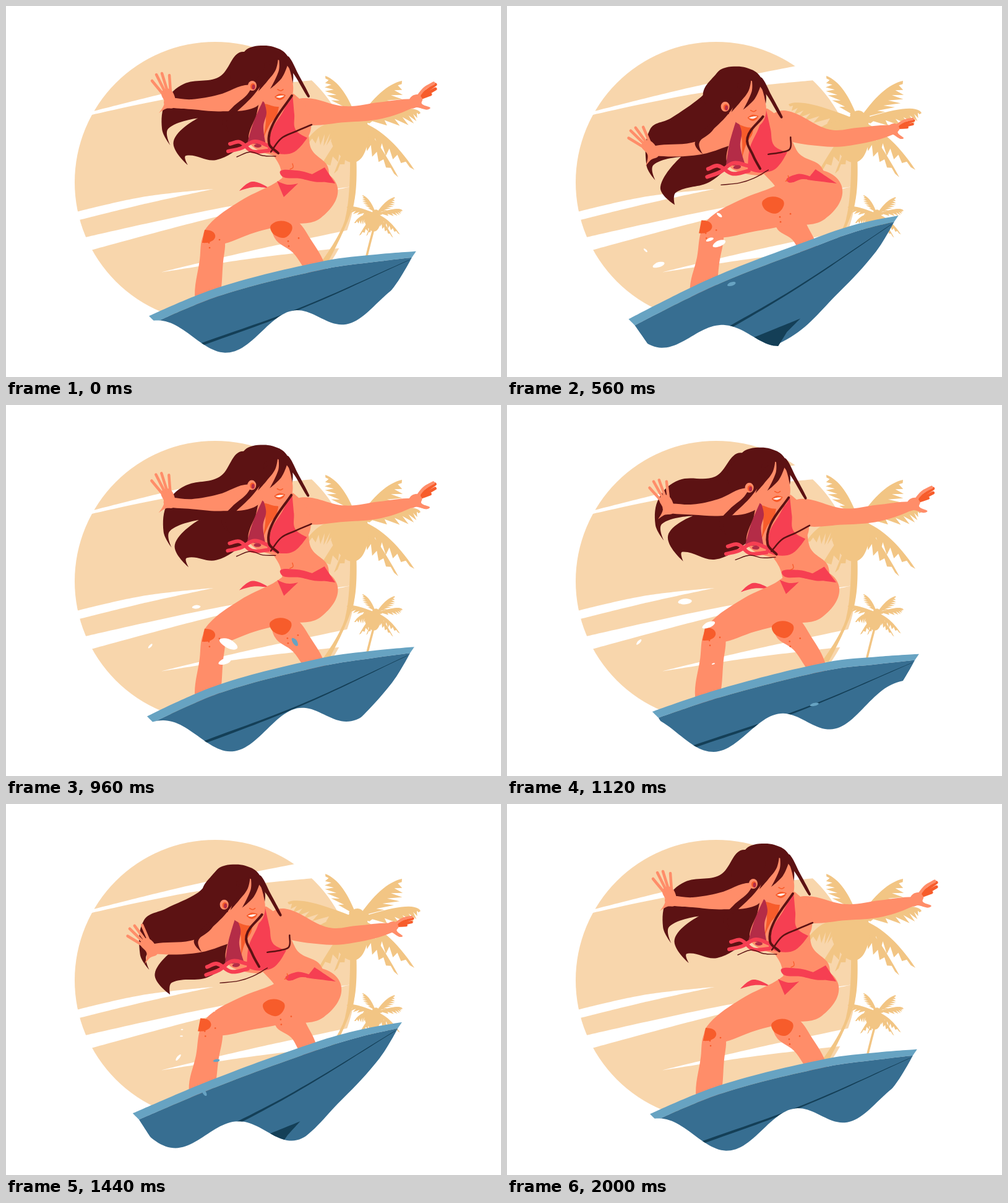
These frames come from a looping animation (800x600 px, 2.04 s). An HTML page with a canvas:

```html
<!DOCTYPE html>
<html lang="en">
<head>
<meta charset="utf-8">
<title>Surfer</title>
<style>
html, body { margin: 0; width: 100%; height: 100%; overflow: hidden; background: #fff; }
canvas { display: block; width: 800px; height: 600px; }
</style>
</head>
<body>
<canvas id="stage" width="800" height="600"></canvas>
<script>
const ctx = document.getElementById('stage').getContext('2d');
const SKIN = '#ff8d69', ORANGE = '#f75c2b', HAIR = '#5c1213', RED = '#f63f52', ROSE = '#b42c47';
const SUN = '#f8d6ac', PALM = '#f2c584', BLUE = '#376e91', LIGHT = '#67a3c2', DARK = '#143f57';
const CYCLE = 1000, LOOP = 2040, STEP = 40;
let phase = 0;

// 0 at the top of the ride, 1 at the bottom; lag is a share of the cycle.
const swing = (lag = 0) => (1 - Math.cos(2 * Math.PI * (phase - lag))) / 2;
const lerp = (a, b, k) => a + (b - a) * k;

// Points are "x,y" or "x,y,width"; a trailing ! marks a corner.
function parse(text) {
  return text.trim().split(/\s+/).map(word => {
    const [x, y, w] = word.split(',').map(parseFloat);
    return { x, y, w, sharp: word.endsWith('!') };
  });
}

// A part swings between its high and low pose; lag(point) gives [x, y] delays.
function part(high, low, lag = () => [0, 0]) {
  const a = parse(high), b = parse(low);
  return () => a.map((p, i) => {
    const [lx, ly] = lag(p), q = b[i];
    return { x: lerp(p.x, q.x, swing(lx)), y: lerp(p.y, q.y, swing(ly)), w: lerp(p.w, q.w, swing(lx)), sharp: p.sharp };
  });
}

const points = shape => typeof shape === 'string' ? parse(shape) : typeof shape === 'function' ? shape() : shape;

function trace(pts, closed) {
  const n = pts.length;
  const get = i => closed ? pts[(i + n) % n] : pts[Math.max(0, Math.min(n - 1, i))];
  const dir = i => {
    const a = get(i - 1), b = get(i + 1), l = Math.hypot(b.x - a.x, b.y - a.y) || 1;
    return get(i).sharp ? [0, 0] : [(b.x - a.x) / l, (b.y - a.y) / l];
  };
  ctx.beginPath();
  ctx.moveTo(pts[0].x, pts[0].y);
  for (let i = 0; i < (closed ? n : n - 1); i++) {
    const a = get(i), b = get(i + 1), s = Math.hypot(b.x - a.x, b.y - a.y) * .36;
    const p = dir(i), q = dir(i + 1);
    ctx.bezierCurveTo(a.x + p[0] * s, a.y + p[1] * s, b.x - q[0] * s, b.y - q[1] * s, b.x, b.y);
  }
}

function fill(shape, color) {
  trace(points(shape), true);
  ctx.fillStyle = color;
  ctx.fill();
}

function line(shape, color, width) {
  trace(points(shape), false);
  ctx.strokeStyle = color;
  ctx.lineWidth = width;
  ctx.lineCap = 'round';
  ctx.stroke();
}

// A tapered, round-ended band along a few joints.
function limb(shape, color) {
  const pts = points(shape), n = pts.length, left = [], right = [], tips = [];
  pts.forEach((p, i) => {
    const a = pts[Math.max(0, i - 1)], b = pts[Math.min(n - 1, i + 1)];
    const l = Math.hypot(b.x - a.x, b.y - a.y), dx = (b.x - a.x) / l * p.w / 2, dy = (b.y - a.y) / l * p.w / 2;
    left.push({ x: p.x + dy, y: p.y - dx });
    right.unshift({ x: p.x - dy, y: p.y + dx });
    if (i === 0) tips.push({ x: p.x - dx, y: p.y - dy });
    if (i === n - 1) tips.push({ x: p.x + dx, y: p.y + dy });
  });
  fill([tips[0], ...left, tips[1], ...right], color);
}

function oval(x, y, rx, ry, color) {
  ctx.beginPath();
  ctx.ellipse(x, y, rx, ry, 0, 0, 7);
  ctx.fillStyle = color;
  ctx.fill();
}

// Carries a drawing made in the high pose along one or two moving anchors.
function carry(high, low, draw, lag = 0) {
  const [a0, b0] = parse(high), [a, b] = part(high, low, () => [lag, lag])();
  let c = 1, s = 0;
  if (b) {
    const ux = b0.x - a0.x, uy = b0.y - a0.y, vx = b.x - a.x, vy = b.y - a.y, l = ux * ux + uy * uy;
    c = (vx * ux + vy * uy) / l;
    s = (vy * ux - vx * uy) / l;
  }
  ctx.save();
  ctx.transform(c, s, -s, c, a.x - c * a0.x + s * a0.y, a.y - s * a0.x - c * a0.y);
  draw();
  ctx.restore();
}

// Toward the tips, hair sweeps sideways early and falls late.
const trail = p => {
  const k = .1 * Math.max(0, Math.min(1, (400 - p.x) / 120));
  return [-k, k];
};
const hair = part(
  '385,74 345,114 290,121 262,150 256,193 269,219! 266,192 312,178! 274,211 296,252! 293,237 340,248 388,222 415,200! 415,120!',
  '355,106 310,147 258,182 222,200 216,258 231,283! 228,258 275,244! 240,294 265,322! 268,302 327,284 366,248 380,215! 370,160!',
  trail);
const leftArm = part('397,146,38 345,157,27 300,159,16 262,156,14', '365,196,45 335,221,30 300,234,21 238,237,16');
const rightArm = part('478,170,42 548,175,26 605,169,27 658,157,14', '443,191,44 518,215,28 570,211,26 620,202,16');
const waist = part('452,205,66 468,245,58 489,282,74', '426,230,64 450,263,64 487,291,72');
const thigh = part('495,303,84 440,322,68 390,341,56 336,370,36', '500,304,86 440,324,66 390,338,56 336,357,36');
const calf = part('336,372,34 332,412,38 324,478,37', '333,360,34 325,410,37 314,466,38');
const backCalf = part('450,360,44 478,388,36 505,430,28', '452,343,44 474,368,32 490,398,26');

const hipTie = part('480,280! 515,261! 532,287!', '485,281! 498,264! 533,287!');
const ribbon = part('443,271 470,266 500,274! 515,284 475,279', '453,284! 470,272 490,276! 505,281! 478,280');
const brief = part('438,283! 455,289 472,287! 449,309!', '458,281! 464,281 470,281! 464,284!');
const looseTie = part('377,299! 398,284 426,295! 400,293', '385,324! 402,312 426,316! 402,318');

const chestLock = part('462,145 432,190 425,222 440,238', '412,180 387,214 397,243 408,264');
const sideLock = part('494,192 468,203 445,214 428,236', '457,213 457,232 445,237 422,240');
const thread = part('436,243 415,242 395,236 373,244', '422,266 398,280 375,288 345,291');

const boardLag = .1;
const deck = part(
  '235,494! 345,459 518,416 603,407 666,403!',
  '196,511! 334,437 494,376 565,352 632,338!',
  p => [boardLag, boardLag + .13 * ((666 - p.x) / 431) ** 4]);
const underside = part('385,580! 480,541! 465,565! 425,600!', '368,548! 474,505! 452,527! 420,580!', () => [boardLag, boardLag]);

// Leaflets hang from one side of a curved rib and lean toward its tip.
function frond(dx, dy, width) {
  const side = Math.sign(dx), k = Math.abs(dx) / (Math.abs(dx) + Math.abs(dy));
  const cx = dx * k, cy = dy * .5 - 25, leaflets = 8, rib = [], edge = [];
  for (let i = 0; i <= leaflets * 2; i++) {
    const u = i / (leaflets * 2), v = 1 - u;
    const x = 2 * u * v * cx + u * u * dx, y = 2 * u * v * cy + u * u * dy;
    const tx = v * cx + u * (dx - cx), ty = v * cy + u * (dy - cy), l = Math.hypot(tx, ty) * side;
    const r = width * Math.sin(Math.PI * u ** .75) * (i % 2 ? 1 : .5), lean = i % 2 ? r * .5 * side : 0;
    rib.push([x, y]);
    edge.unshift([x + (-ty * r + tx * lean) / l, y + (tx * r + ty * lean) / l]);
  }
  ctx.beginPath();
  [...rib, ...edge].forEach(p => ctx.lineTo(...p));
  ctx.fillStyle = PALM;
  ctx.fill();
}

function crown(x, y, scale) {
  ctx.save();
  ctx.translate(x, y);
  ctx.scale(scale, scale);
  ['-52,-72,26', '72,-64,34', '102,-12,28', '92,80,26', '66,92,22', '-113,-26,30', '-84,36,34', '-65,84,30', '-38,86,24']
    .forEach(f => frond(...f.split(',').map(Number)));
  fill('-22,4 0,-16 16,4 14,46 -6,68 -34,50 -42,24', PALM);
  ctx.restore();
}

function drawScene() {
  oval(338, 285, 227, 227, SUN);
  fill('138,171! 300,131 467,97! 497,120! 310,141 130,178!', '#fff');
  fill('110,334! 220,309 335,296! 220,321 115,347!', '#fff');
  fill('120,376! 340,328 558,292! 340,341 130,397!', '#fff');
  fill('249,431! 400,395 560,361! 545,391! 400,408', '#fff');
  fill('566,240! 562,320 520,415! 508,416! 548,345 556,240!', PALM);
  crown(568, 185, 1);
  line('597,350 589,380 582,408', PALM, 3.5);
  crown(598, 336, .42);
}

function drawCap() {
  fill('385,74 395,67 412,64 432,66 452,77 463,102 462,130 448,150 405,156 382,142 362,110', HAIR);
}

function drawFace() {
  fill('437,86! 424,96 411,116 404,140! 418,156 440,163 456,157 464,138 461,112 455,93!', SKIN);
  fill('440,84! 436,103 422,122 408,138! 415,115 418,92!', HAIR);
  fill('441,84! 441,104 427,134! 446,116 457,90!', HAIR);
  fill('437,87 428,103 402,142 372,172 356,188 362,206! 349,188 366,164 390,143 407,115', HAIR);
  limb('454,86,10 470,112,6 489,146,4', HAIR);
  oval(398, 129, 7, 8, SKIN);
  oval(399, 130, 4, 5, ORANGE);
  oval(400, 131, 2.5, 4, ROSE);
  line('439,135 444,137 448,135', ORANGE, 1.5);
  fill('434,147! 442,142 452,144! 448,150 441,152', ORANGE);
  fill('436,147! 443,145 450,145! 443,148.5', '#fff');
}

function drawChest() {
  fill('412,142! 465,142! 489,170 488,212 442,244! 405,232 392,214 404,180!', SKIN);
  fill('418,158! 441,163! 437,178 426,192 416,214! 420,185', ORANGE);
  fill('416,152! 400,188 390,222! 420,224! 416,195 421,172', ROSE);
  fill('463,142! 447,172 430,200 423,232! 440,239 466,236 487,213! 468,200 466,175', RED);
  line('424,226 402,219 380,230 359,235', RED, 6);
  line('424,234 398,235 378,220 362,223', RED, 6);
  oval(407, 226, 6, 3, ROSE);
}

function drawLeftHand() {
  fill('251,141 258,134 267,136 274,152 272,164 259,166 247,173! 256,157', SKIN);
  for (const f of ['255,144 236,121', '257,139 243,111', '261,138 252,109', '266,140 264,112']) line(f, SKIN, 4.5);
}

function drawRightHand() {
  line('672,143 694,127', ORANGE, 5);
  line('672,147 694,134', ORANGE, 5);
  line('670,149 686,143', ORANGE, 5);
  line('662,152 676,134 691,125', SKIN, 5);
  fill('652,151 664,143 673,150 672,158 685,166 664,164 655,165', SKIN);
}

function freckles(x, y) {
  oval(x, y, 1.3, 1.3, ORANGE);
  oval(x - 17, y + 5, 1.3, 1.3, ORANGE);
  oval(x - 16, y + 13, 1.3, 1.3, ORANGE);
}

function drawLegs() {
  limb(backCalf, SKIN);
  limb(waist, SKIN);
  limb(calf, SKIN);
  limb(thigh, SKIN);
  carry('327,372', '320,356', () => {
    fill('321,362! 334,365 338,374 329,382 317,383!', ORANGE);
    freckles(345, 378);
  });
  carry('446,364', '430,322', () => {
    fill('430,356 445,350 461,355 463,365 452,377 437,374 429,365', ORANGE);
    freckles(474, 378);
  }, .08);
  [ribbon, brief, hipTie].forEach(p => fill(p, RED));
  carry('461,260', '452,280', () => line('463,255 464,261 459,264', ORANGE, 1.3));
}

// Waterline: a wave that travels one length per cycle below the board.
function water(x) {
  const u = ((x - 325) / 290) ** 2;
  const crest = 516.5 - 130 * u / (1 + u), trough = 561 - .001 * (x - 338) ** 2;
  return lerp(crest, trough, (1 - Math.cos(2 * Math.PI * ((x - 459) / 204 + phase))) / 2);
}

function drawBoard() {
  const top = deck(), tail = top[0], nose = top[4];
  const rail = top.map((p, i) => ({ ...p, x: p.x + 10 - 4.2 * i, y: p.y + 10 + Math.sin(i * Math.PI / 4) * 3 }));
  const edge = [[-36, 58], [-97, 125], [-180, 200]].map(([x, y]) => ({ x: nose.x + x, y: nose.y + y }));
  const tipX = nose.x - 11, tipY = nose.y + 14;
  ctx.save();
  ctx.beginPath();
  ctx.moveTo(150, 0);
  for (let x = 150; x <= 720; x += 4) ctx.lineTo(x, water(x));
  ctx.lineTo(720, 0);
  ctx.clip();
  fill([...top, ...rail.slice().reverse()], LIGHT);
  fill([...rail, ...edge, { x: tail.x + 75, y: 610, sharp: true }], BLUE);
  fill(underside, DARK);
  limb([{ x: 303, y: 552, w: 4 }, { x: (303 + tipX) / 2, y: (552 + tipY) / 2 + 7, w: 2.5 }, { x: tipX, y: tipY, w: .6 }], DARK);
  ctx.restore();
}

function random(seed) {
  return () => {
    seed = (seed * 16807) % 2147483647;
    return seed / 2147483647;
  };
}

// Spray: white flecks blown to the left, blue ones thrown off the deck.
const next = random(4711);
const spray = Array.from({ length: 30 }, (_, i) => {
  const blue = i % 4 === 0, size = 5 + 24 * next() ** 2;
  return {
    born: 180 + 1440 * (i + next()) / 30,
    x: blue ? 320 + 260 * next() : 150 + 260 * next(),
    y: blue ? 400 + 110 * next() : 330 + 170 * next(),
    w: size, h: size * (.3 + .2 * next()), turn: next() * 2 - 1, color: blue ? LIGHT : '#fff'
  };
});

function drawSpray(t) {
  const life = 320;
  for (const d of spray) {
    const k = (t - d.born) / life;
    if (k <= 0 || k >= 1) continue;
    const grow = Math.sin(Math.PI * k);
    ctx.save();
    ctx.translate(d.x - 40 * k, d.y - 60 * k + 50 * k * k);
    ctx.rotate(d.turn);
    ctx.scale(d.w * grow, d.h * grow);
    fill('-1,-.1 -.4,-.9 .4,-.8 1,.1 .5,.9 -.5,.7', d.color);
    ctx.restore();
  }
}

function draw(t) {
  phase = t % CYCLE / CYCLE;
  ctx.fillStyle = '#fff';
  ctx.fillRect(0, 0, 800, 600);
  drawScene();
  const head = draw => carry('443,146', '396,181', draw);
  fill(hair, HAIR);
  head(drawCap);
  limb(leftArm, SKIN);
  carry('266,152 249,111', '234,236 204,203', drawLeftHand);
  fill(looseTie, RED);
  drawLegs();
  limb(rightArm, SKIN);
  carry('658,157 696,126', '619,202 658,187', drawRightHand);
  carry('463,143 445,240', '417,168 412,271', drawChest);
  head(drawFace);
  line(chestLock, HAIR, 4);
  line(sideLock, HAIR, 2.5);
  line(thread, HAIR, 1.4);
  drawBoard();
  drawSpray(t);
}

function tick() {
  const t = performance.now() % LOOP;
  draw(Math.floor(t / STEP) * STEP);
  requestAnimationFrame(tick);
}
tick();
</script>
</body>
</html>
```
